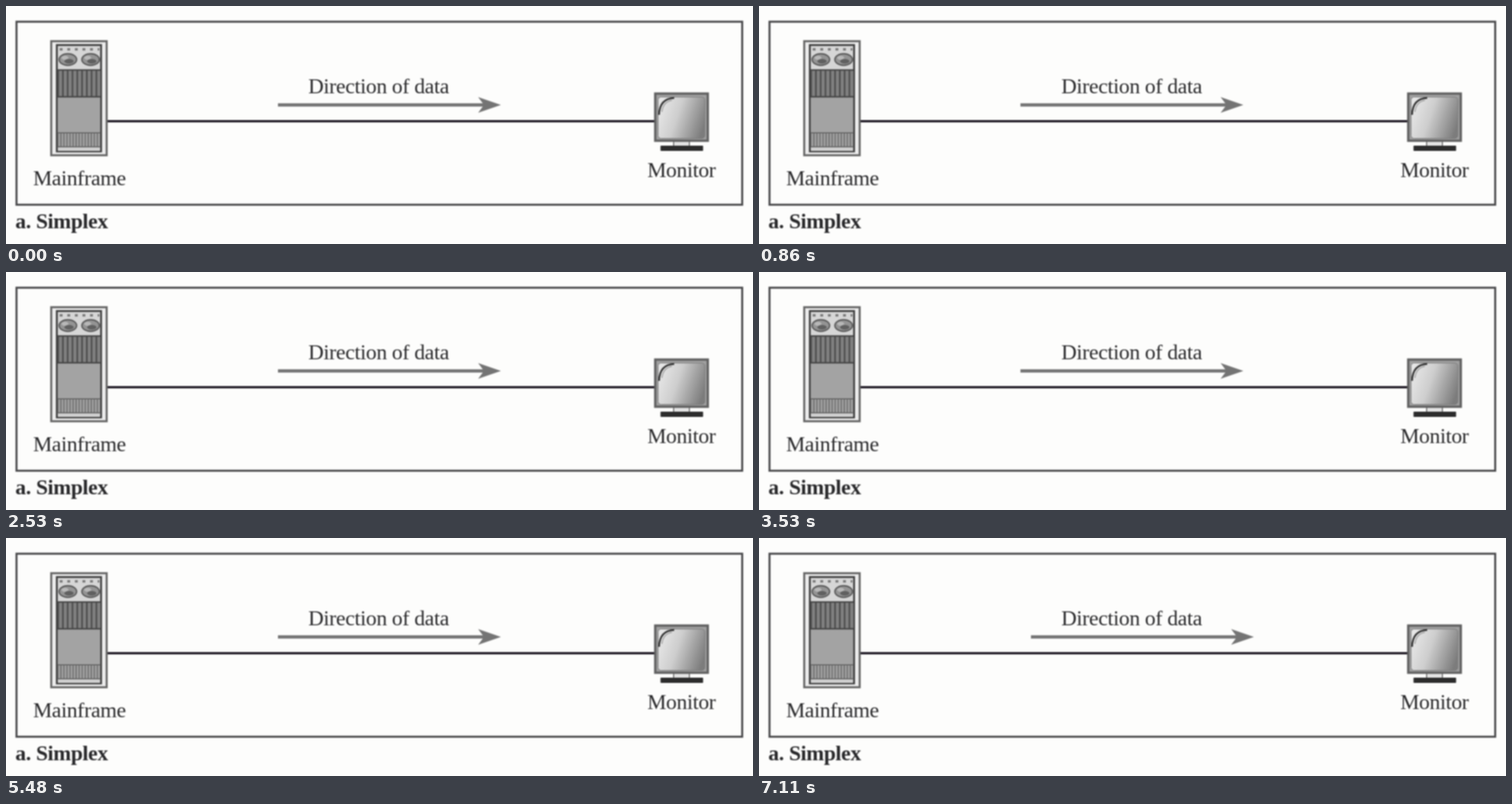
These frames come from a looping animation (1280x409 px, 7.16 s). An HTML page:

```html
<!DOCTYPE html>
<html lang="en">
<head>
<meta charset="utf-8">
<title>Simplex transmission</title>
<style>
  html, body { margin: 0; width: 100%; height: 100%; overflow: hidden; background: #fdfdfc; }
  svg { display: block; width: 100%; height: 100%; filter: blur(1px); }
  text { font: 36.6px "Liberation Serif", "Times New Roman", serif; letter-spacing: -.4px; fill: #29292b; }
  .caption { font-weight: bold; }
</style>
</head>
<body>
<svg viewBox="0 0 1280 409">
  <defs>
    <linearGradient id="glass" x1="0" y1=".35" x2="1" y2=".65">
      <stop offset="0" stop-color="#e6e6e6"/>
      <stop offset=".4" stop-color="#cecece"/>
      <stop offset="1" stop-color="#7c7c7c"/>
    </linearGradient>
    <pattern id="slats" width="8.2" height="50" x="88" patternUnits="userSpaceOnUse">
      <rect width="8.2" height="50" fill="#808080"/>
      <rect width="2.6" height="50" fill="#4a4a4a"/>
    </pattern>
    <pattern id="grille" width="5.2" height="30" x="88" patternUnits="userSpaceOnUse">
      <rect width="5.2" height="30" fill="#a2a2a2"/>
      <rect width="1.8" height="30" fill="#686868"/>
    </pattern>
    <g id="reel">
      <ellipse rx="15" ry="10" fill="#949494" stroke="#5c5c5c" stroke-width="2.5"/>
      <ellipse cx="-5" cy="-3" rx="6" ry="3.5" fill="#b8b8b8"/>
      <ellipse cx="2" cy="3" rx="8" ry="4" fill="#606060"/>
    </g>
  </defs>

  <rect x="18" y="27" width="1243.5" height="314.5" fill="none" stroke="#48484a" stroke-width="3.4"/>
  <path d="M174 198H1112" stroke="#241f28" stroke-width="4"/>

  <g id="mainframe">
    <rect x="77.5" y="60.5" width="95" height="196" fill="#ededed" stroke="#666" stroke-width="3.5"/>
    <rect x="87" y="67" width="76" height="183" fill="#a3a3a3" stroke="#3c3c3c" stroke-width="3"/>
    <rect x="89" y="69" width="72" height="40" fill="#d6d6d6"/>
    <path d="M92 74.5H160" stroke="#777" stroke-width="4" stroke-dasharray="5 8"/>
    <use href="#reel" x="106" y="92"/>
    <use href="#reel" x="145" y="92"/>
    <rect x="88" y="111" width="74" height="45" fill="url(#slats)"/>
    <path d="M88 110H162M88 156H162" stroke="#444" stroke-width="2.5"/>
    <rect x="88" y="218" width="74" height="24" fill="url(#grille)"/>
    <path d="M88 218H162M88 242H162" stroke="#666" stroke-width="2"/>
    <rect x="89" y="243" width="72" height="6" fill="#d0d0d0"/>
  </g>

  <g id="monitor">
    <path d="M1144 232V242H1171V232" fill="#e4e4e4" stroke="#777" stroke-width="2"/>
    <rect x="1121.5" y="240" width="73" height="9" rx="1" fill="#2c2c2c"/>
    <rect x="1112.5" y="150.5" width="90" height="81" fill="#a0a0a0" stroke="#606060" stroke-width="4"/>
    <rect x="1117.5" y="156.5" width="80" height="71" rx="5" fill="url(#glass)" stroke="#777"/>
    <path d="M1119 187Q1120 159 1145 158" fill="none" stroke="#333" stroke-width="3"/>
    <path d="M1124 182Q1126 165 1141 162" fill="none" stroke="#999" stroke-width="1.5"/>
  </g>

  <g id="arrow" fill="#747474">
    <rect y="167.2" width="356" height="5.6"/>
    <path d="M382 170L343 156.5L353 170L343 183.5Z"/>
  </g>

  <text x="518" y="150.3">Direction of data</text>
  <text x="46.5" y="307.5">Mainframe</text>
  <text x="1099" y="294.3">Monitor</text>
  <text x="16" y="382" class="caption">a. Simplex</text>
</svg>
<script>
  const LOOP = 7160;
  const TAIL_X = [466, 485, 448];
  // The arrow hops to its next place at each of these times (ms).
  const HOPS = [50, 520, 1050, 1480, 2000, 2530, 3000, 3480,
                4010, 4530, 5010, 5480, 6010, 6440, 7010];
  const arrow = document.getElementById("arrow");

  function draw() {
    const time = performance.now() % LOOP;
    const hops = HOPS.filter(hop => hop <= time).length;
    arrow.setAttribute("transform", `translate(${TAIL_X[hops % 3]} 0)`);
    requestAnimationFrame(draw);
  }
  draw();
</script>
</body>
</html>
```
